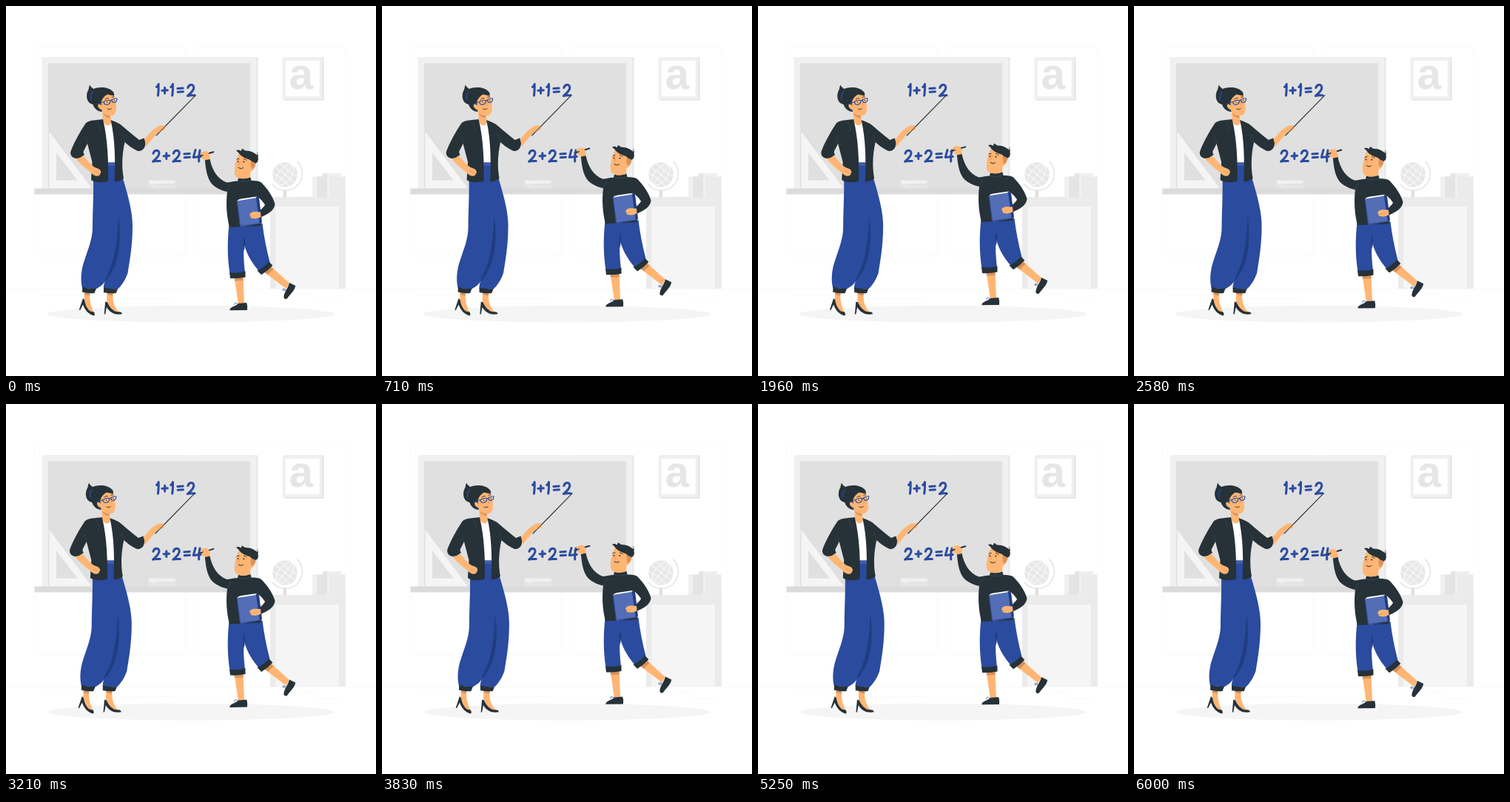
Write an HTML page that moves like this. It is 500 px wide and 500 px high and loops after 6.04 s.

```html
<!DOCTYPE html>
<html lang="en">
<head>
<meta charset="utf-8">
<title>Maths lesson</title>
<style>
  html, body { margin: 0; width: 100%; height: 100%; overflow: hidden; background: #fff; }
  svg { display: block; width: 100%; height: 100%; }
  .line { fill: none; stroke-linecap: round; stroke-linejoin: round; }
  .dark { fill: #263238; }
  .skin { fill: #ffb573; }
  .shade { fill: #d9925a; }
  .blue { fill: #2b4b9f; }
  .navy { fill: #213c80; }
</style>
</head>
<body>
<svg viewBox="0 0 500 500">
  <g id="room">
    <g class="line" stroke="#ebebeb" stroke-width=".3">
      <rect x="38.3" y="55.1" width="204.3" height="282.6" rx="5.6"/>
      <rect x="254.6" y="55.1" width="204.3" height="282.6" rx="5.6"/>
      <path d="M0 382.5H500M416.8 398.6h33M322.5 401.3h8.7M396.6 389.3h19.2M52.5 391h43.2M104.6 391h6.3M131.5 395.2h93.7"/>
    </g>
    <!-- board, shelf and tools -->
    <path fill="#e6e6e6" d="M52 69.400H340.500V247H52z"/>
    <path fill="#f0f0f0" d="M48.500 69.400H338.500V247H48.500z"/>
    <path fill="#e0e0e0" d="M57 77.300H329.700V247H57z"/>
    <path fill="#f5f5f5" fill-rule="evenodd" d="M58.500 170L116 246.500H58.500zM68 198V235.500H96.500z"/>
    <path fill="#f0f0f0" d="M193 235.500H230V241H193z"/>
    <path fill="#e6e6e6" d="M193 241H230V247H193z"/>
    <path class="line" stroke="#d5d5d5" stroke-width=".7" d="M204 241H229.500V236.500"/>
    <path fill="#dbdbdb" d="M38.500 246.500H349V254.500H38.500z"/>
    <!-- framed letter -->
    <path fill="#e2e2e2" d="M376 69.400H429.500V127.500H376z"/>
    <path fill="#f0f0f0" d="M373.500 69.400H428V126H373.500z"/>
    <path fill="#fff" d="M378 74H423.500V122H378z"/>
    <text x="382.500" y="112.300" font-family="'Liberation Sans', Arial, sans-serif" font-weight="700" font-size="58.500" fill="#e6e6e6">a</text>
    <!-- globe -->
    <circle cx="377" cy="228" r="16.800" fill="#e8e8e8"/>
    <g class="line" stroke="#fff" stroke-width=".9" transform="rotate(38 377 228)">
      <ellipse cx="377" cy="228" rx="8.500" ry="16.500"/>
      <path d="M377 211V245M360.500 228H393.500M363 219.500Q377 223 391 219.500M363 236.500Q377 233 391 236.500"/>
    </g>
    <path class="line" stroke="#e2e2e2" stroke-width="1.400" d="M394 210C403 220 402 237 391 245C381 252 367 250 360 241"/>
    <path fill="#e0e0e0" d="M374.500 249H379V258.500H374.500z"/>
    <!-- books and cabinet -->
    <path fill="#f0f0f0" d="M414 230.500H428V258.500H414zM434 226H453V258.500H434z"/>
    <path fill="#e4e4e4" d="M420 230.500H428V258.500H420zM428 226H434V258.500H428z"/>
    <path fill="#ebebeb" d="M437 230.500H458.500V258.500H437z"/>
    <path fill="#f5f5f5" d="M364.500 271H450V382H364.500z"/>
    <path fill="#ebebeb" d="M357 258H459V271H357zM357 271H364.500V382H357zM450 271H459V382H450z"/>
    <ellipse cx="250" cy="416.200" rx="193.900" ry="11.300" fill="#f5f5f5"/>
  </g>

  <!-- hand lettering on the board -->
  <g class="line" stroke="#2b4b9f" stroke-width="3" role="img" aria-label="1+1=2, 2+2=4">
    <defs>
      <path id="one" d="M0 4Q2 2.500 2.600 0Q3 8 1.900 15.500"/>
      <path id="two" d="M.5 4.500C2-.5 8.500-1 8.500 4.500C8 9.500 3.500 12 0 15.500C3 14.200 6 14.800 9.700 14.800"/>
      <path id="plus" d="M0 4.700L7.500 4.300M3.800 .8V8.400"/>
      <path id="equal" d="M0 .4L7.300 0M.3 5.200L7.600 4.800"/>
    </defs>
    <use href="#one" x="203.500" y="105.500"/>
    <use href="#plus" x="210.800" y="109.500"/>
    <use href="#one" x="222.800" y="105.500"/>
    <use href="#equal" x="231.800" y="111"/>
    <use href="#two" x="245.300" y="106"/>
    <use href="#two" x="198.500" y="194.700"/>
    <use href="#plus" x="213" y="198"/>
    <use href="#two" x="225.800" y="194.700"/>
    <use href="#equal" x="240.800" y="199.500"/>
    <path d="M256 194.500C255 198 253.800 202 253.300 204.500Q258 204 263.200 203.500M262 195Q260 203 260.700 210"/>
  </g>

  <g id="teacher">
    <!-- legs and shoes -->
    <path class="skin" d="M106 386H113.500C112 398 115 406 118.500 414L112 414.500L105.500 402zM136.500 386H145C143 399 147 408 153 414L144 414.500L136 404z"/>
    <path class="shade" d="M106 387H113.500L113 391.500L106 390zM137 387H145L144 391.500L137 390z"/>
    <path class="dark" d="M104 395L98.800 410.500L100.200 411L104 403.500C107 412 112.500 417 119 418.500C120.500 417.500 120 414.500 118 413C112 414.500 107 405 106 397z"/>
    <path class="dark" d="M134.200 399.500L132.700 416.500H134.200L136 407C140.500 415 148.500 418 156.800 416.300C157 414 155 413 152 413.200C146 414 139.500 407 137 400.500z"/>
    <path class="blue" d="M118 234L138 211H147L158 233C166 260 171 279 171 297C171 325 167 345 164.500 361C161 371 156 378 151 382.500L132 382C131.500 378 132.500 375 134 371.500C131 377 126 380 121.500 382.500L103 381C101 372 101 362 104 350C110 330 117 316 117 299C117 279 118.500 255 118 234z"/>
    <path class="navy" d="M152 283C156 312 155 350 134 372C134 367 138 362 141 354C148 337 151 312 152 283z"/>
    <path class="dark" d="M103.300 379.500Q112 383 122 381.500L119.500 388Q111 388.800 103 386.500zM132 380.500Q141 383 151 382L148.800 388Q140 389 132 387z"/>
    <!-- shirt, neck and jacket -->
    <path fill="#fff" d="M130 157H145L150 211.500H137z"/>
    <path fill="#415dab" d="M137 211.500H148V216H137z"/>
    <path class="skin" d="M130 138L131 153C131 160 139 165 142 158L141 146z"/>
    <path class="shade" d="M131 144.500C134 147.500 138 148.500 140.500 148.300L140.700 151C136 151 132.500 148.500 131 144.500z"/>
    <path class="dark" d="M131 153C121 154.500 113 154 108 158C100 170 91 186 87.300 197C86.500 203 91 206.500 98 206.500L106 201C104 198 104.500 196 106 194L110 186L116.500 211L115 235C120 239 132 239 138 236.500C138.500 210 137.500 180 131 153z"/>
    <path class="dark" d="M141.500 154C146 156 153 158 157 162C165 169 174 176 180 181L186.500 178.500Q190 184 187 191.500C185 195 180 197.500 176 195C170 192 165 188 160.500 184C157 200 156 216 159 233Q153 238 146.500 237C148 210 147.500 180 141.500 154z"/>
    <path class="line" stroke="#3d4a51" stroke-width=".6" d="M110 186L108 177M160.500 184Q159 178 157 174M123 156L127 166L125 170"/>
    <!-- hands and pointer -->
    <path class="skin" d="M94.500 206C99 213 109 220 114.500 225C118 229 122 230.500 125.500 229.300C127 228.500 126.500 227.500 127.800 226C129.500 223 126.500 220 122.500 219C116 217 110.500 209 105 202.800Q100 206 94.500 206z"/>
    <path class="line" stroke="#d9925a" stroke-width=".7" d="M119 223Q123 223.500 126 226.500"/>
    <path class="line" stroke="#263238" stroke-width="1.100" d="M203 175L256.300 120.700"/>
    <path class="skin" d="M187 180.500C192 174 196 169 200.500 166C205 162.500 209 160.500 213 161.500C216 163 216 166.500 213 168C209 169.300 206 170.500 203 173C198.500 179 193 185 188 191Q189.500 186 187 180.500z"/>
    <path class="line" stroke="#263238" stroke-width="1" d="M208.500 169.400L214.500 163.300"/>
    <!-- head -->
    <path class="dark" d="M113.300 106.500C114 109 116.500 110.500 118 112C126 108.500 139 109 145 116C147.500 120 146 124 141 126L131 129L129 139L130 143C125 143 119 139 117.500 133C108 131 107.500 119 111.500 113Q112 109 113.300 106.500z"/>
    <path class="skin" d="M128.500 131.500C129 126 132.500 122 137 119.500Q142 120.500 146.200 121.500C148 127 149.300 133 149 139C149 145 146 148.200 141.500 148.300C136.500 148 132 145 130 140C125 140 122 133 126 132.500Q128 132.500 129.500 135z"/>
    <path class="line" stroke="#2b4b9f" stroke-width="1.400" d="M117.500 116Q113.500 120 115 126"/>
    <g class="line" stroke="#2b4b9f" stroke-width="1.200">
      <path d="M124 132.500L132 129.500Q137 126.500 140.800 127.500Q141 132.500 136.500 133.500Q132.500 133.500 132 129.500M140.800 128L142.700 127.200Q146 124 150 125Q150 129.500 146.500 130.500Q143.300 130.800 142.700 127.200"/>
    </g>
    <path class="line" stroke="#263238" stroke-width=".9" d="M136.700 129.700v.8M146.300 127.200v.8M134 126Q136 124 138.500 124.500M143 123.300Q144.500 122 146 122.700M137 139Q140 141 142.500 138.800"/>
    <path class="line" stroke="#d9925a" stroke-width=".8" d="M142.500 130.500Q145 133.500 142.500 134.500"/>
    <circle cx="127.500" cy="140.800" r="1" class="blue"/>
  </g>

  <g id="boy">
    <!-- legs and shoes -->
    <path class="skin" d="M308.500 366L320.500 365L322 403L314 403.500zM349.500 360L358 352L383 374.500L378.500 382z"/>
    <path class="shade" d="M308.500 367L320.500 366V371L309 371.500zM349.500 360L358 352L361.500 355.500L354 363z"/>
    <path class="dark" d="M302.300 411.300C302.500 406 310.500 406.500 313.500 402L325 401C326.500 404.500 326.300 408 325.800 411z"/>
    <path class="dark" d="M375.500 394.500C374.500 388 381 382 383 374L391.200 378C390 385 383.500 390 379.500 395.800Q376.500 396.500 375.500 394.500z"/>
    <path class="line" stroke="#4f73c4" stroke-width="1" d="M309 403.500Q308.500 400 311.500 401.500L314 403M378 383Q373.500 381 374 384L377.500 384.500"/>
    <path class="blue" d="M301.500 295L346.500 294C348.500 311 352 329 356.500 346L342.500 359C331 346 323 331 321.500 319C320.500 334 321.500 348 323 360.500L302.500 361.500C299 340 299 318 301.500 295z"/>
    <path class="navy" d="M321 313Q323 314 323.500 317L321.800 332C320.500 327 320.500 320 321 313z"/>
    <path class="dark" d="M302 360Q313 361.500 323.500 358.500V366.500Q313 368.500 303 368zM339.500 357.500Q349 353 355.500 345.500L360.300 350.800Q354 358 345 363.300z"/>
    <!-- pen and raised hand -->
    <path class="line" stroke="#263238" stroke-width="2" d="M263 202.500L280.300 197.300"/>
    <path class="line" stroke="#263238" stroke-width=".9" d="M259.500 203.600L263 202.500"/>
    <path class="skin" d="M262.300 200C264 197 268 195.500 271.500 196.500C275 198.500 276 203 275.500 208.500L269.500 209.500C268.500 207 264.500 206.500 263.800 203.800Q267 202.500 267 200.500Q264 202 262.300 200z"/>
    <!-- sweater -->
    <path class="dark" fill-rule="evenodd" d="M275.500 207C278.500 222 286 234 298.500 238.500C304 238 309 236.500 313 236.500L314 232.500Q322 234.500 330.500 231.500L331.500 236C336 236 342 236 345.500 239C353.500 247 361 258 363.500 267.500C363 277 352 282 344.500 285.500L344.500 297L302 299C298 284 297 266 299 251C290 249 282 245 277 239C271 230 270 219 268.800 208.500zM341.500 259L343.500 276C346 273.500 349 271 350 268.500Q346.500 263 341.500 259z"/>
    <path class="line" stroke="#42515a" stroke-width=".6" d="M299 251Q300 246 304 242M313.500 236.500Q322 239 331 235.500"/>
    <!-- book and hand -->
    <path fill="#fff" d="M312 263.500Q314 261 318 260.500L338.500 257.500L341 260L316 265z"/>
    <path class="navy" d="M337.500 258L340.500 258.500Q342 259.500 342.300 262L346 292.500L342.500 294z"/>
    <path fill="#536eb6" d="M312 263.500L338 259.300L342.800 294L318 298.500Q316.500 298.500 316 296.500z"/>
    <path class="line" stroke="#2b4b9f" stroke-width="1" d="M312.200 264L316.700 297.500L345 293.500"/>
    <path class="skin" d="M344 278.500C339 278 333.500 277.500 330.500 279.800C328.800 282 329 283.500 330.500 284C330 286 332 287.500 334 287C338 288 342 286.500 344.500 285z"/>
    <path class="line" stroke="#d9925a" stroke-width=".6" d="M330.500 284Q333 283 336 284"/>
    <!-- head -->
    <path class="skin" d="M314.500 200C310.500 208 308.500 218 309 226C309.300 231 314 233.500 321 233.300Q326 233.500 330 231.500L330.500 224C335 222 337.500 217 337.500 211L335 204z"/>
    <path class="shade" d="M331.500 207.500L337.500 210C338 214 336 219 332 220.500Q329.500 214 331.500 207.500z"/>
    <path class="dark" d="M311 195.200Q314 193.500 317.500 196L319 192.800Q321.500 194 323 195.500C329 195 336 198 339 201.500L341 200.500Q340.500 202.500 340.500 204Q341.500 207 340 210.500L337.500 212.500Q332 210.500 329 207.500C322 205.500 316 202 314.500 198.500Q313 197 311 195.200z"/>
    <path class="line" stroke="#263238" stroke-width=".6" d="M339 201L340 198"/>
    <path class="line" stroke="#263238" stroke-width="1" d="M311.800 207.500Q313 205.800 315 206.500M321.500 206.500Q324 206.500 325 208.500M314 218.500Q317 221.200 320.500 218.800"/>
    <circle cx="313.500" cy="210.300" r="1" fill="#263238"/>
    <circle cx="321.300" cy="210.600" r="1" fill="#263238"/>
    <path class="line" stroke="#d9925a" stroke-width=".8" d="M316.500 210.500Q312.500 214 315.500 215"/>
  </g>
</svg>
<script>
  const LOOP = 6040, CYCLE = 6000, FLOAT = 3000, LIFT = 10;
  // Horizontal sway of the teacher at each tenth of the cycle.
  const SWAY = [0, -1, 2, -4, 4, -4, 4, -4, 2, -1, 0];
  const teacher = document.getElementById('teacher');
  const boy = document.getElementById('boy');

  function sway(time) {
    const position = time / CYCLE * (SWAY.length - 1);
    const index = Math.min(Math.floor(position), SWAY.length - 2);
    return SWAY[index] + (SWAY[index + 1] - SWAY[index]) * (position - index);
  }

  function rise(time) {
    const phase = time % FLOAT / FLOAT;
    return -LIFT * (1 - Math.abs(1 - 2 * phase));
  }

  function render(now) {
    const time = Math.min(now % LOOP, CYCLE);
    teacher.setAttribute('transform', `translate(${sway(time).toFixed(3)} 0)`);
    boy.setAttribute('transform', `translate(0 ${rise(time).toFixed(3)})`);
  }

  const start = performance.now();
  function tick() {
    render(performance.now() - start);
    requestAnimationFrame(tick);
  }
  tick();
</script>
</body>
</html>
```
